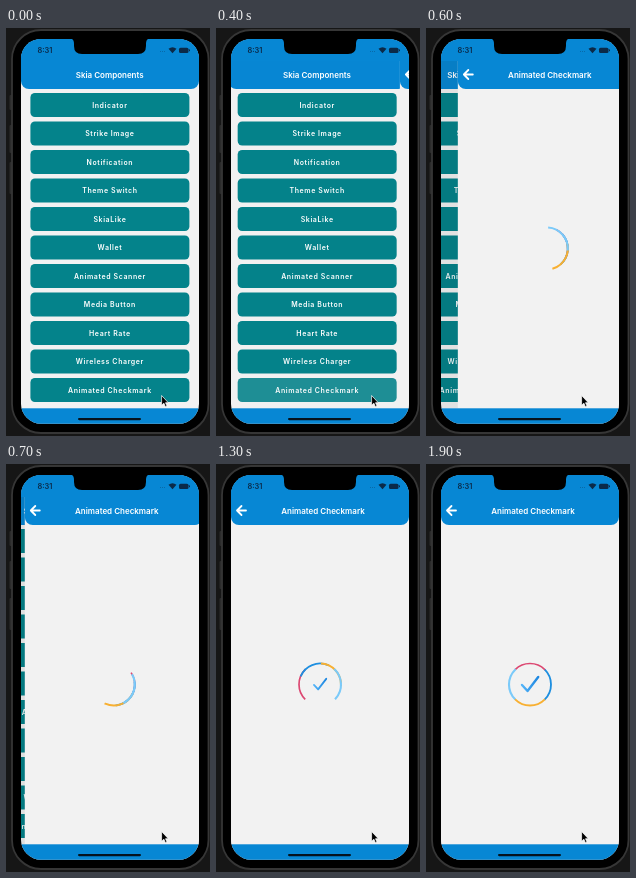
Recreate the animation shown at these times as an HTML page. Size 204x408 px, loop 2000 ms.

```html
<!DOCTYPE html>
<html lang="en">
<head>
<meta charset="utf-8">
<title>Skia Components</title>
<style>
  html, body { margin: 0; height: 100%; overflow: hidden; background: #161616; }
  svg { display: block; width: 100%; height: 100%; }
  text { font: 600 8px Inter, sans-serif; fill: #fff; text-anchor: middle; }
  .soft { filter: blur(.4px); }
  .label { font-size: 7px; letter-spacing: .6px; }
  .time { font-size: 7.4px; fill: #0b2a48; }
  .line { fill: none; stroke-linecap: round; stroke-linejoin: round; }
</style>
</head>
<body>
<svg viewBox="0 0 204 408">
  <defs>
    <clipPath id="screen"><rect x="15" y="11" width="178" height="384.7" rx="20"/></clipPath>
    <linearGradient id="tick" x1="0" x2="1">
      <stop offset="0" stop-color="#54b4f8"/><stop offset="1" stop-color="#1c86e0"/>
    </linearGradient>
  </defs>

  <g class="soft">
    <!-- phone body -->
    <g fill="#2c2c2c">
      <rect x="3.5" y="67" width="3" height="15" rx="1"/>
      <rect x="3.5" y="97" width="3" height="28" rx="1"/>
      <rect x="3.5" y="134" width="3" height="32" rx="1"/>
    </g>
    <rect x="6" y="2" width="196.5" height="403" rx="29" stroke="#363636" stroke-width="1.8"/>

    <g clip-path="url(#screen)">
      <rect x="15" y="11" width="178" height="385" fill="#f2f2f2"/>
      <g id="list">
        <path d="M15 11H193V53a8 8 0 0 1-8 8H23a8 8 0 0 1-8-8Z" fill="#0787d4"/>
        <text x="103.7" y="49.5">Skia Components</text>
        <g id="buttons"></g>
      </g>
      <rect id="dim" x="15" y="33" width="178" height="347"/>
      <g id="detail">
        <rect x="15" y="33" width="178" height="347" fill="#f2f2f2"/>
        <path d="M15 11H193V53a8 8 0 0 1-8 8H23a8 8 0 0 1-8-8Z" fill="#0787d4"/>
        <path class="line" d="M30 46.5H21M25.5 42L21 46.5L25.5 51" stroke="#fff" stroke-width="1.8"/>
        <text x="107" y="49.5">Animated Checkmark</text>
        <g id="ring" class="line"></g>
        <path id="check" class="line" d="M-8 .5L-2.5 6.5L8.2-7.5" stroke="url(#tick)" stroke-width="2.4"/>
      </g>
      <rect x="15" y="11" width="178" height="22" fill="#0787d4"/>
      <rect x="15" y="380.3" width="178" height="16" fill="#0787d4"/>

      <!-- status bar -->
      <text class="time" x="39" y="25">8:31</text>
      <path d="M66 11H142Q140 12 140 16V18Q140 26 132 26H76Q68 26 68 18V16Q68 12 66 11Z"/>
      <g fill="#0b2a48">
        <path d="M154 23h1v1h-1zM156 23h1v1h-1zM158 23h1v1h-1z" opacity=".3"/>
        <path d="M162.5 20.8Q166.5 17.6 170.5 20.8L166.5 25.2Z"/>
        <rect x="173" y="19.7" width="9.5" height="5.2" rx="1.5"/>
        <rect x="183" y="21.3" width="1" height="2" rx=".5"/>
      </g>
      <rect x="72" y="390" width="63" height="2.2" rx="1.1" fill="#06121c"/>
    </g>
    <path d="M155.6 367.5V377.2L157.9 375.2L159.4 378.8L161 378.1L159.5 374.7H162.3Z" stroke="#fff" stroke-width=".7"/>
  </g>
</svg>
<script>
const LOOP = 2000, STEP = 100, PAGE = 178, DONE = 1620;
const el = id => document.getElementById(id);

const names = ["Indicator", "Strike Image", "Notification", "Theme Switch", "SkiaLike", "Wallet",
  "Animated Scanner", "Media Button", "Heart Rate", "Wireless Charger", "Animated Checkmark"];
el("buttons").innerHTML = names.map((name, i) => `<g transform="translate(0 ${77 + 28.5 * i})">
  <rect x="24.4" y="-12" width="159" height="24" rx="4.5" fill="#04838b"/>
  <text class="label" x="103.9" y="2.5">${name}</text></g>`).join("");
const pressed = el("buttons").lastElementChild;

// Quarter arcs, back to front: colour, resting angle, speed in degrees per ms
const arcs = [
  ["#dc4872", 225, .282],
  ["#1e8fe0", 315, .35],
  ["#f8b032", 45, .414],
  ["#7bcaf9", 135, .57]
];
// Arcs at the back are thinner, so that those in front hide them cleanly
el("ring").innerHTML = arcs.map(([color], i) =>
  `<circle r="21" pathLength="360" stroke-dasharray="92 268" stroke-linecap="butt"
    stroke="${color}" stroke-width="${1.7 + .14 * i}"/>`).join("");
const rings = [...el("ring").children];

const clamp = v => Math.max(0, Math.min(1, v));

// Critically damped spring
function slide(t) {
  const x = Math.max(0, t - 380) * .018;
  return x > 9 ? 1 : 1 - (1 + x) * Math.exp(-x);
}

function draw(t) {
  const p = slide(t), left = Math.max(0, DONE - t);
  el("list").setAttribute("transform", `translate(${-.3 * PAGE * p} 0)`);
  el("detail").setAttribute("transform", `translate(${PAGE * (1 - p)} 0)`);
  el("dim").setAttribute("opacity", .08 * p);
  pressed.setAttribute("opacity", t < 300 ? 1 : clamp(.81 + (t - 300) * .0008));
  rings.forEach((ring, i) => {
    const [, rest, speed] = arcs[i];
    ring.setAttribute("transform", `translate(104 220.5) rotate(${rest - speed * left})`);
  });
  el("check").setAttribute("transform", `translate(104 220.5) scale(${clamp(1 - left * .00076)})`);
  el("check").setAttribute("opacity", clamp((t - 700) / 600));
}

const start = performance.now();
function tick() {
  const t = (performance.now() - start) % LOOP;
  draw(Math.floor(t / STEP) * STEP);
  requestAnimationFrame(tick);
}
tick();
</script>
</body>
</html>
```
